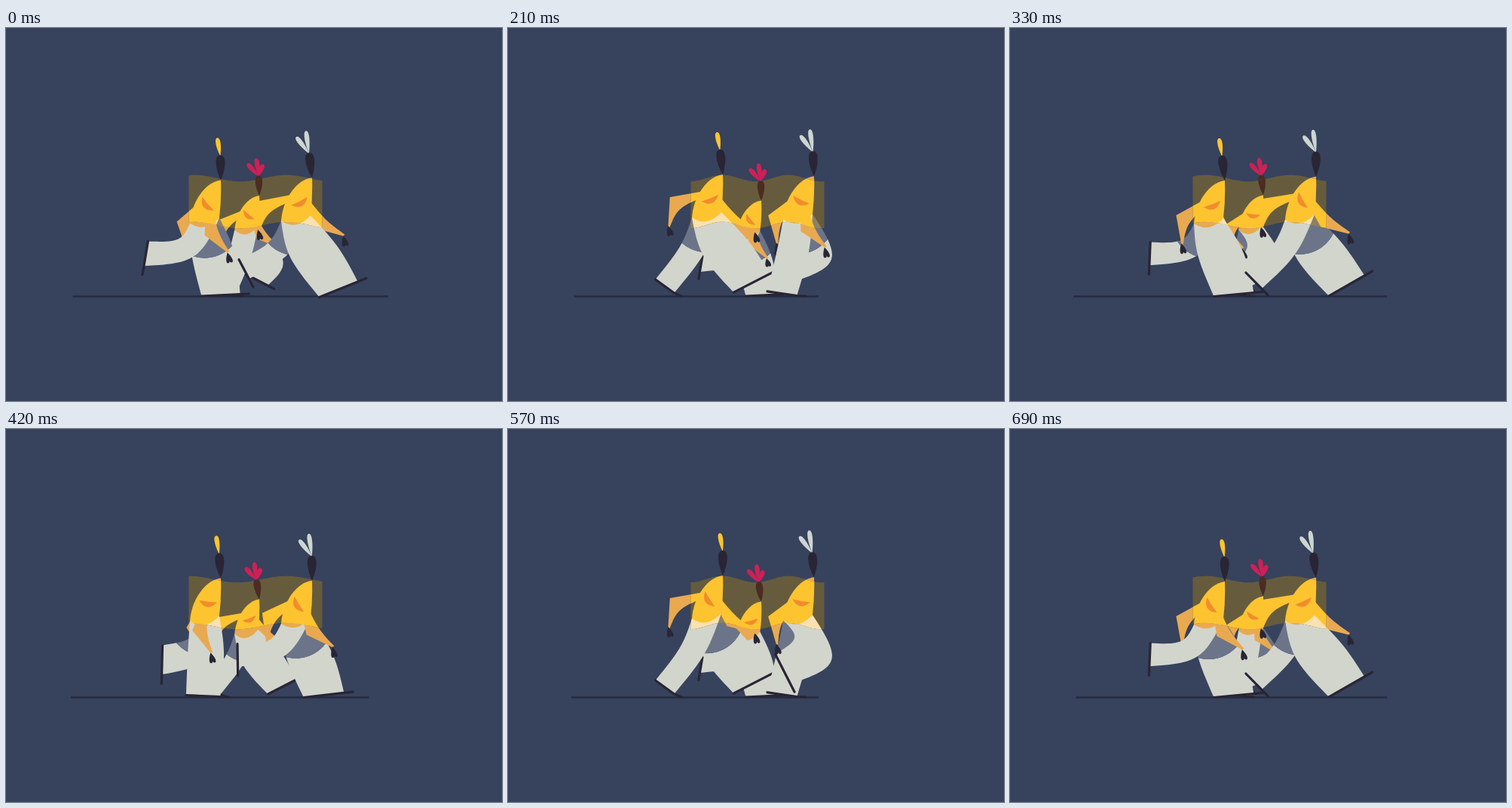
An HTML page for the animation above (0.72 s loop, 658 by 494 pixels).

```html
<!DOCTYPE html>
<html lang="en">
<head>
<meta charset="utf-8">
<title>Walkers</title>
<style>
html, body { margin: 0; width: 100%; height: 100%; overflow: hidden; background: #37425d; }
svg { display: block; width: 100%; height: 100%; }
</style>
</head>
<body>
<svg id="stage" viewBox="0 0 658 494"></svg>
<script>
const LOOP = 720, HALF = LOOP / 2, STEP = 30, FLOOR = 355;
const stage = document.getElementById('stage');

const PLAIN = { id: 'p', body: '#e9a950', leg: '#d2d5cc', shade: '#6c7489', fold: '#ee8b31' };
const VEIL = { id: 'v', body: '#fdc430', leg: '#f9e1b1', shade: '#8d8165', fold: '#f28c2c' };
const DARK = '#292534';

// x, y: mean neck position; strike: when the near heel lands
const walkers = [
  { id: 'mid', x: 336, y: 226, size: .8, strike: 420, bob: -4.5, peak: 335,
    head: '#4b2c22', feather: '#ce2057', sprigs: [[-3, -23], [-15, -16], [6, -15]] },
  { id: 'left', x: 285, y: 197, size: 1, strike: 210, bob: 5, peak: 335,
    head: DARK, feather: '#fdc430', sprigs: [[-4, -23]] },
  { id: 'right', x: 406, y: 198, size: 1, strike: 670, bob: 3, peak: 85,
    head: DARK, feather: '#ccd5d1', sprigs: [[-4, -29], [-17, -21]] }
];

// One stride from heel strike in even steps: foot x, lift, tilt, knee x
const stride = [
  [58, 17, -27, 24], [42, 4, -9, 18], [8, 1, 0, 6], [-26, 4, 10, -8],
  [-57, 13, 36, -17], [-77, 52, 82, -22], [-73, 54, 100, -14], [-14, 35, 56, 36]
];

const wave = (t, peak, period) => Math.cos(2 * Math.PI * (t - peak) / period);
const rad = deg => deg * Math.PI / 180;
const add = (p, x, y) => [p[0] + x, p[1] + y];
const mix = (a, b, k) => [a[0] + (b[0] - a[0]) * k, a[1] + (b[1] - a[1]) * k];
const polar = (p, len, a) => add(p, len * Math.cos(a), len * Math.sin(a));
const hang = (p, len, deg) => polar(p, len, rad(90 - deg));
const pt = p => p[0].toFixed(1) + ' ' + p[1].toFixed(1);
const shape = (d, fill) => `<path d="${d}" fill="${fill}"/>`;

// Periodic Catmull-Rom through the stride
function step(t) {
  const n = stride.length, s = ((t % LOOP + LOOP) % LOOP) / LOOP * n;
  const i = Math.floor(s), u = s - i;
  const [a, b, c, d] = [-1, 0, 1, 2].map(k => stride[(i + k + n) % n]);
  return b.map((v, j) => v + u / 2 * (c[j] - a[j]
    + u * (2 * a[j] - 5 * v + 4 * c[j] - d[j] + u * (3 * (v - c[j]) + d[j] - a[j]))));
}

// Curve from a to b that turns tightly at the bend
const turn = (a, bend, b) => `C${pt(mix(a, bend, .9))} ${pt(mix(b, bend, .9))} ${pt(b)}`;

// Teardrop with its point at a and its round end at b
function petal(a, b, w, fill) {
  const dx = b[0] - a[0], dy = b[1] - a[1], len = Math.hypot(dx, dy);
  const q = (s, side) => pt([
    a[0] + dx * s - dy / len * side * w,
    a[1] + dy * s + dx / len * side * w]);
  return shape(`M${pt(a)}C${q(.4, -1)} ${q(1, -1.6)} ${pt(b)}C${q(1, 1.6)} ${q(.4, 1)} ${pt(a)}Z`, fill);
}

function leg(m, t, hipB, hipF, fill) {
  const [x, lift, tilt, bend] = step(t);
  const hipX = m.x - 20 * m.size, hipY = (hipB[1] + hipF[1]) / 2, a = rad(tilt);
  const half = m.size * (21 + 6.5 * wave(t, 60, LOOP));
  const foot = [hipX + x * m.size, FLOOR - lift * m.size];
  const heel = polar(foot, -half, a), toe = polar(foot, half, a);
  const tip = polar(toe, 12 * m.size, a);
  tip[1] = Math.min(tip[1], FLOOR);
  const knee = [hipX + bend * m.size, mix([0, hipY], [0, FLOOR], .43)[1]];
  const girth = half * 1.1 + Math.max(0, bend) * .3;
  const back = polar(knee, -girth, a / 2), front = polar(knee, girth, a / 2);
  return shape(`M${pt(hipB)}${turn(hipB, back, heel)}L${pt(toe)}${turn(toe, front, hipF)}Z`, fill)
    + `<path d="M${pt(heel)}L${pt(toe)}L${pt(tip)}" fill="none" stroke="${DARK}" stroke-width="3.2" stroke-linejoin="round" stroke-linecap="round"/>`;
}

function arm(m, t, neck, fill) {
  const k = m.size, swing = wave(t, 20, LOOP);
  const shoulder = add(neck, -19 * k, 21 * k);
  const elbow = hang(shoulder, 52 * k, -26 - 55 * swing);
  const wrist = hang(elbow, 38 * k, 36 - 40 * swing);
  const dx = wrist[0] - shoulder[0], dy = wrist[1] - shoulder[1], len = Math.hypot(dx, dy);
  const inner = (p, w) => add(p, dy / len * w * k, -dx / len * w * k);
  return petal(wrist, add(wrist, k, 14 * k), 2.3, DARK)
    + petal(wrist, add(wrist, 6 * k, 13 * k), 2.3, DARK)
    + shape(`M${pt(shoulder)}L${pt(elbow)}L${pt(wrist)}L${pt(inner(wrist, 3))}`
      + turn(inner(wrist, 3), inner(elbow, 16), inner(shoulder, 7)) + 'Z', fill);
}

function torso(neck, hipB, hipF, fill) {
  const dx = hipB[0] - neck[0], dy = hipB[1] - neck[1];
  const c1 = add(neck, dx * .5, dy * .04), c2 = add(hipB, 2, -dy * .5);
  const sag = add(mix(hipB, hipF, .5), 0, 17), chest = add(mix(neck, hipF, .5), 2, 0);
  return shape(`M${pt(neck)}C${pt(c1)} ${pt(c2)} ${pt(hipB)}Q${pt(sag)} ${pt(hipF)}Q${pt(chest)} ${pt(neck)}Z`, fill);
}

function fold(m, t, neck, fill) {
  const k = m.size, c = add(neck, -17 * k, 31 * k), a = rad(18 - 45 * wave(t, 60, LOOP));
  const from = polar(c, -12 * k, a), to = polar(c, 12 * k, a);
  const sag = w => pt(polar(c, w * k, a + Math.PI / 2));
  return shape(`M${pt(from)}Q${sag(15)} ${pt(to)}Q${sag(1)} ${pt(from)}Z`, fill);
}

function walker(m, t, ink) {
  const k = m.size, near = t - m.strike, far = near + HALF;
  const neck = [m.x, m.y + m.bob * wave(t, m.peak, HALF)];
  const top = add(neck, -2 + 2 * wave(near, 410, LOOP), -33 * k);
  const hipB = add(neck, -41 * k, 57 * k), hipF = add(neck, -2 * k, 50 * k);
  const [cx, cy] = mix(hipB, hipF, .5), id = ink.id + m.id;
  return `<radialGradient id="${id}" gradientUnits="userSpaceOnUse" cx="${cx}" cy="${cy}" r="${50 * k}">`
    + `<stop offset=".99" stop-color="${ink.shade}"/><stop offset="1" stop-color="${ink.leg}"/></radialGradient>`
    + arm(m, far, neck, ink.body)
    + leg(m, far, hipB, hipF, `url(#${id})`)
    + leg(m, near, hipB, hipF, ink.leg)
    + torso(neck, hipB, hipF, ink.body)
    + arm(m, near, neck, ink.body)
    + fold(m, near, neck, ink.fold)
    + m.sprigs.map(([x, y]) => petal(add(top, 0, 1), add(top, x, y), 3.2, m.feather)).join('')
    + petal(neck, top, 6 * k, m.head);
}

const scene = (t, ink) => walkers.map(m => walker(m, t, ink)).join('');

function veil(t) {
  const length = 108 + 22 * wave(t, 50, HALF);
  const edge = (x, y) => pt([x, y - 4.3 * wave(x, 372, length)]);
  const upper = [], lower = [];
  for (let x = 242.5; x < 420; x += 3) {
    upper.push(edge(x, 199));
    lower.unshift(edge(x, 261));
  }
  return 'M' + upper.concat(lower).join('L') + 'Z';
}

function draw(t) {
  const x1 = 86 + 2.5 * wave(t, 0, 240), x2 = 456 + 51 * wave(t, 0, HALF);
  stage.innerHTML = '<rect width="658" height="494" fill="#37425d"/>'
    + `<path d="M${x1} 355.5H${x2}" stroke="#252b40" stroke-width="2.4"/>`
    + scene(t, PLAIN)
    + `<clipPath id="veil"><path d="${veil(t)}"/></clipPath>`
    + '<g clip-path="url(#veil)"><rect width="658" height="494" fill="#665c3d"/>'
    + scene(t, VEIL) + '</g>';
}

let start = null, last = -1;
function tick(now) {
  if (start === null) start = now;
  const t = Math.floor((now - start) % LOOP / STEP) * STEP;
  if (t !== last) draw(last = t);
  requestAnimationFrame(tick);
}
draw(0);
requestAnimationFrame(tick);
</script>
</body>
</html>
```
